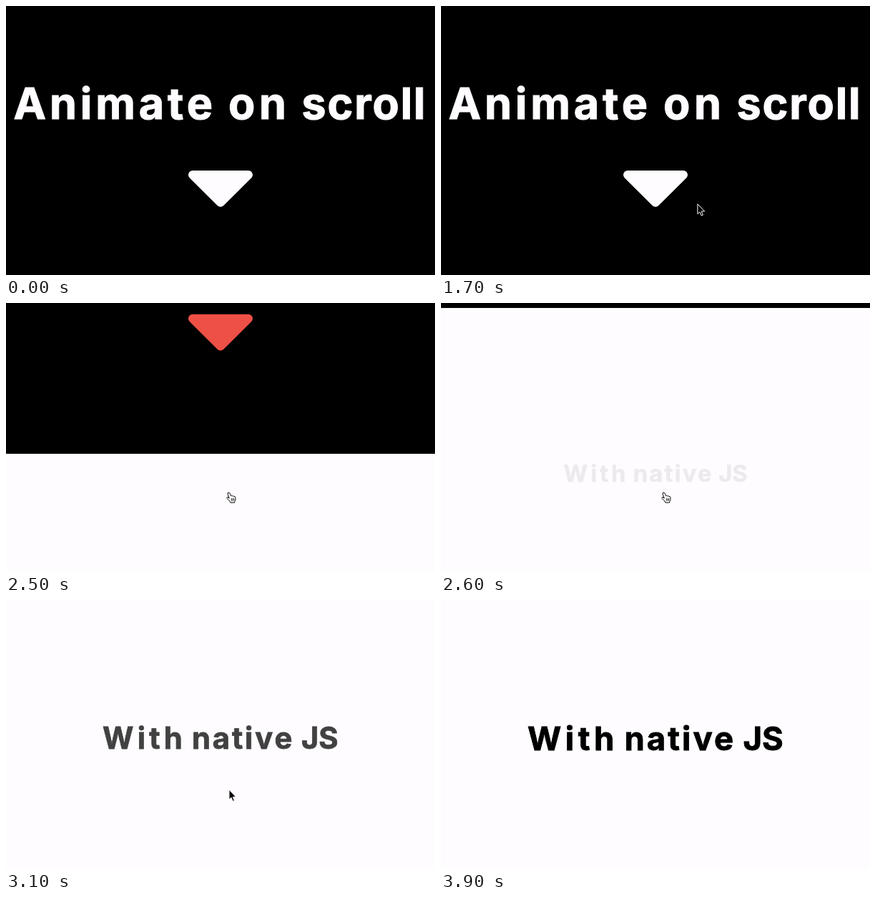
Recreate the animation shown at these times as an HTML page. Size 600x376 px, loop 7.2 s.

```html
<!DOCTYPE html>
<html lang="en">
<head>
<meta charset="utf-8">
<title>Animate on scroll</title>
<style>
  html, body { margin: 0; width: 100%; height: 100%; overflow: hidden; background: #000; }
  svg { display: block; width: 100vw; height: 100vh; }
  text { font-family: Inter, Roboto, sans-serif; font-weight: 700; stroke-width: .018em; }
  #title { font-size: 61px; fill: #fefcff; stroke: #fefcff; }
  #tagline { font-size: 45.5px; fill: #000; stroke: #000; }
  #caret { stroke-width: 12; stroke-linejoin: round; }
  #arrow, #hand { stroke-width: 1; stroke-linejoin: round; stroke-linecap: round; }
</style>
</head>
<body>
<svg viewBox="0 0 600 376">
  <g id="page">
    <g id="title">
      <text x="10.5" y="157.5" letter-spacing=".08em">Animate</text>
      <text x="311" y="157.5" letter-spacing=".092em">on</text>
      <text x="413.5" y="157.5" letter-spacing=".03em">scroll</text>
    </g>
    <path id="caret" d="M261 236H339L300 274.8Z"/>
    <rect y="425" width="600" height="500" fill="#fefcff"/>
    <g id="tagline">
      <text x="-179" y="16.6" letter-spacing=".122em">With</text>
      <text x="-43.5" y="16.6" letter-spacing=".067em">native</text>
      <text x="122.5" y="16.6">JS</text>
    </g>
  </g>
  <path id="arrow" fill="#000" stroke="#fff"
    d="M0 .5V14L3 11.2L5.3 16.3L7.5 15.4L5.3 10.3H9.4Z"/>
  <g id="hand" transform="translate(308 264)" fill="#fff" stroke="#000">
    <path d="M2.6 1.2Q4 .2 5 1.9L6.5 5.5Q7.7 4.5 8.6 5.9Q10 4.9 10.8 6.4Q12.6 5.9 12.9 7.8V10.5Q12.8 12.5 11.8 13.4L11.6 15H5.9Q5.2 13 3.4 11.4Q1.2 9.3 .8 8.3Q.9 6.7 3 7.8L4.2 8.9L2.1 3Q1.8 1.8 2.6 1.2Z"/>
    <path d="M7.3 9.3V12.3M9 9.3V12.3M10.7 9.3V12.3" stroke-width=".8"/>
  </g>
</svg>
<script>
  const LOOP = 7200, STEP = 100, SCROLL = 463;
  const WHITE = '#fefcff', RED = '#ef5046';
  const [page, caret, tagline, arrow, hand] =
    ['page', 'caret', 'tagline', 'arrow', 'hand'].map(id => document.getElementById(id));

  const progress = (t, from, to) => Math.min(1, Math.max(0, (t - from) / (to - from)));
  const smooth = x => x * x * (3 - 2 * x);
  const mix = (a, b, k) => a + (b - a) * k;

  // The CSS "ease" curve, cubic-bezier(.25, .1, .25, 1), solved by bisection.
  function ease(x) {
    const bezier = (p, q, u) => 3 * p * u * (1 - u) ** 2 + 3 * q * u * u * (1 - u) + u ** 3;
    let lo = 0, hi = 1;
    for (let i = 0; i < 24; i++) {
      const mid = (lo + hi) / 2;
      if (bezier(.25, .25, mid) < x) lo = mid; else hi = mid;
    }
    return bezier(.1, 1, lo);
  }

  function show(el, on) {
    el.style.display = on ? '' : 'none';
  }

  function draw(t) {
    const scroll = SCROLL * smooth(progress(t, 2357, 2658));
    page.setAttribute('transform', `translate(0 ${-scroll})`);

    const color = t >= 1800 ? RED : WHITE;
    caret.setAttribute('fill', color);
    caret.setAttribute('stroke', color);

    const reveal = ease(progress(t, 2490, 3870));
    tagline.setAttribute('transform', `translate(300 656) scale(${mix(.7, 1, reveal)})`);
    tagline.setAttribute('opacity', reveal);

    // The pointer glides to the caret, rests, then drops away.
    const arrive = smooth(progress(t, 1200, 1900));
    const leave = progress(t, 3200, 3600) ** 2;
    const x = mix(548.5, 312, arrive) + 12 * leave;
    const y = mix(324, 265, arrive) + 84 * leave;
    arrow.setAttribute('transform', `translate(${x} ${y})`);

    const pointing = t >= 2000 && t < 2900;
    show(hand, pointing);
    show(arrow, !pointing && t >= 1200 && t < 3700);
  }

  const start = performance.now();
  function tick() {
    const t = (performance.now() - start) % LOOP;
    draw(Math.floor(t / STEP) * STEP);
    requestAnimationFrame(tick);
  }
  tick();
</script>
</body>
</html>
```
